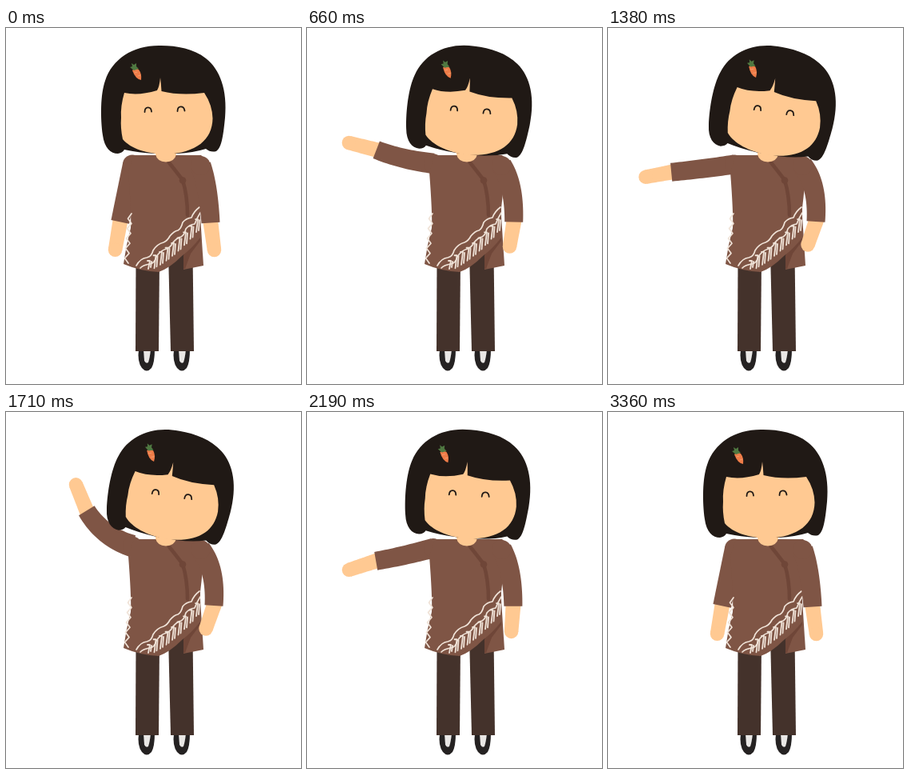
These frames come from a looping animation (369x445 px, 3390 ms). An HTML page with a canvas:

```html
<!DOCTYPE html>
<html lang="en">
<head>
<meta charset="utf-8">
<title>Waving girl</title>
<style>
html, body { margin: 0; width: 100%; height: 100%; overflow: hidden; background: #fff; }
canvas { display: block; width: 369px; height: 445px; }
</style>
</head>
<body>
<canvas id="stage" width="369" height="445"></canvas>
<script>
const ctx = document.getElementById('stage').getContext('2d');
const LOOP = 3390, STEP = 30;
const SKIN = '#ffc992', HAIR = '#201915', SHIRT = '#7f5545', TRIM = '#6f4638',
      PANTS = '#44322b', CREAM = '#f0e3d8', SHOE = '#252222';

const mix = (a, b, t) => a + (b - a) * t;
const mixPt = (a, b, t) => [mix(a[0], b[0], t), mix(a[1], b[1], t)];
const ease = (t, from, to) => {
  const u = Math.min(1, Math.max(0, (t - from) / (to - from)));
  return (1 - Math.cos(Math.PI * u)) / 2;
};

function fill(d, color) {
  ctx.fillStyle = color;
  ctx.fill(new Path2D(d));
}

function line(d, color, width) {
  ctx.strokeStyle = color;
  ctx.lineWidth = width;
  ctx.stroke(new Path2D(d));
}

function dot([x, y], r, color) {
  ctx.fillStyle = color;
  ctx.beginPath();
  ctx.arc(x, y, r, 0, 7);
  ctx.fill();
}

// Tapered band along a quadratic curve
function ribbon(a, b, c, w0, w1, color) {
  const left = [], right = [], n = 20;
  for (let i = 0; i <= n; i++) {
    const t = i / n;
    const p = mixPt(a, b, t), q = mixPt(b, c, t);
    const [x, y] = mixPt(p, q, t);
    const dx = q[0] - p[0], dy = q[1] - p[1];
    const k = mix(w0, w1, t) / 2 / Math.hypot(dx, dy);
    left.push([x - dy * k, y + dx * k]);
    right.unshift([x + dy * k, y - dx * k]);
  }
  ctx.fillStyle = color;
  ctx.beginPath();
  for (const pt of left.concat(right)) ctx.lineTo(...pt);
  ctx.fill();
}

function arm(shoulder, bend, cuff, hand, width) {
  ribbon(mixPt(cuff, hand, -0.12), mixPt(cuff, hand, 0.4), hand, 19, 17.5, SKIN);
  dot(hand, 8.7, SKIN);
  ribbon(shoulder, bend, cuff, width, 23, SHIRT);
  dot(shoulder, 12, SHIRT);
}

// Angles in degrees: 0 points left, positive points down
const reach = ([x, y], angle, len) => {
  const r = angle * Math.PI / 180;
  return [x - Math.cos(r) * len, y + Math.sin(r) * len];
};

function wavingArm(lift, drop) {
  const raise = lift * (1 - drop);
  const swing = 78 - 122.5 * lift - 70 * lift * lift * (1 - lift);
  const upper = mix(swing, 7.6, drop);
  const fore = mix(80 - 111 * lift - 45 * lift * lift, 11.5, drop);
  const curl = mix(20 * lift ** 3, 1, drop);
  const len = mix(73.5, 79.5, drop);
  const shoulder = [158, 170.5];
  const cuff = reach(shoulder, upper, len);
  const bend = reach(shoulder, upper + curl, len * 0.54);
  const top = [158, 170.5 - 4 * raise ** 3];
  arm(top, bend, cuff, reach(cuff, fore, mix(35.5, 32.6, drop)), 24 + 5 * raise ** 3);
}

function restingArm(lift) {
  arm([243.5, 172], mixPt([253, 198], [263, 196], lift),
      mixPt([256, 243.5], [260, 242], lift), mixPt([260.5, 277.5], [250, 271], lift), 26);
}

function legs() {
  for (const x of [0, 44]) {
    fill(`M${166 + x} 402H${186 + x}Q${186 + x} 418 ${182 + x} 425Q${176 + x} 432 ${170 + x} 425Q${164 + x} 417 ${166 + x} 402Z`, SHOE);
    fill(`M${172 + x} 402H${181 + x}Q${180 + x} 412 ${178 + x} 418Q${175 + x} 420 ${173 + x} 416Z`, '#e9e7e5');
  }
  fill('M162.5 290H192L191 404H162Z', PANTS);
  fill('M203 280H233.5L235 404H206Z', PANTS);
}

function shirt() {
  fill('M224 262L243 235L247 297L222 302Z', SHIRT);
  fill('M222 284L243 256V266L231 282L224 301H222Z', TRIM);
  fill('M160 159H244Q250 163 248 180L243 225L243 262Q232 276 220 285Q205 300 191 305Q168 304 147 295Q150 272 156 250Q157 232 153 180Z', SHIRT);
  line('M203 167L221 190Q227 210 227 234', TRIM, 4.5);
  dot([221, 190.5], 4.3, TRIM);
}

function batik() {
  const wave = 'Q168 288 176 287Q182 286 184 278Q189 270 197 268Q202 266 205 260Q210 254 215 253Q219 251 221 243Q225 238 232 237Q235 229 242 224';
  line('M163 297' + wave, CREAM, 1.7);
  ctx.save();
  ctx.translate(4, 8);
  line('M164 292' + wave.replace('242 224', '239 223'), CREAM, 1.7);
  ctx.restore();

  // Row of small upright figures climbing along the hem
  for (let i = 0; i < 9; i++) {
    const x = 179 + i * 7.5;
    const y = 296 - i * 3.4 - i * i * 0.34;
    const h = i ? 8 : 5;
    line(`M${x - 2} ${y - h}H${x + 1}L${x - 1} ${y + h}M${x + 3} ${y - h + 1}L${x + 2} ${y + h - 2}`, CREAM, 1.8);
  }

  let zig = 'M157 232';
  for (let i = 1; i <= 10; i++) {
    const x = 155 - i * 0.5 + (i % 2 ? -2 : 3);
    zig += `L${x} ${232 + i * 6.2}`;
  }
  line(zig, CREAM, 1.7);
}

function head(tilt) {
  ctx.save();
  ctx.translate(195, 157);
  ctx.rotate(tilt * 9.8 * Math.PI / 180);
  ctx.translate(-195, -157);

  fill('M194 22C160 21 133 38 124 66C118 83 118 112 121 134C123 150 131 157 140 157Q146 156 148 152Q166 156 186 157H214Q234 156 250 151Q256 156 263 154C270 150 272 132 274 112C277 78 268 52 250 38C235 26 214 22 194 22Z', HAIR);
  fill('M148 81Q166 85 189 78Q192 73 193 62Q194 71 194.5 79Q218 85 248 81Q258 96 258.5 113C258 140 238 156 200 158C176 157 156 151 146 139Q143 125 144 112Q143 98 148 81Z', SKIN);
  line('M173.5 105C173.5 97.5 181.5 97.5 182 104.5', HAIR, 1.8);
  line('M214.5 104C214.5 96.5 222.5 96.5 223.5 103.5', HAIR, 1.8);

  fill('M158 53Q161 49 166 52Q170 57 169 65Q162 64 158 53Z', '#ee7c48');
  line('M161 56L164 55M165 60L168 59', '#f3a071', 0.9);
  fill('M160 53L155 49L158 48L157 44L160 46L163 44L163 48L166 51Z', '#4f7841');
  ctx.restore();
}

function draw(t) {
  const lift = ease(t, 285, 900) - ease(t, 1800, 2550);
  const drop = ease(t, 900, 1350) - ease(t, 1350, 1800);
  ctx.fillStyle = '#fff';
  ctx.fillRect(0, 0, 369, 445);
  legs();
  wavingArm(lift, drop);
  shirt();
  batik();
  restingArm(lift);
  fill('M187 150H213V158Q211 167 200 167.5Q189 167 187 158Z', SKIN);
  head(lift);
}

ctx.lineCap = ctx.lineJoin = 'round';
const start = performance.now();
function tick(now) {
  const t = Math.max(0, now - start) % LOOP;
  draw(Math.floor(t / STEP) * STEP);
  requestAnimationFrame(tick);
}
draw(0);
requestAnimationFrame(tick);
</script>
</body>
</html>
```
